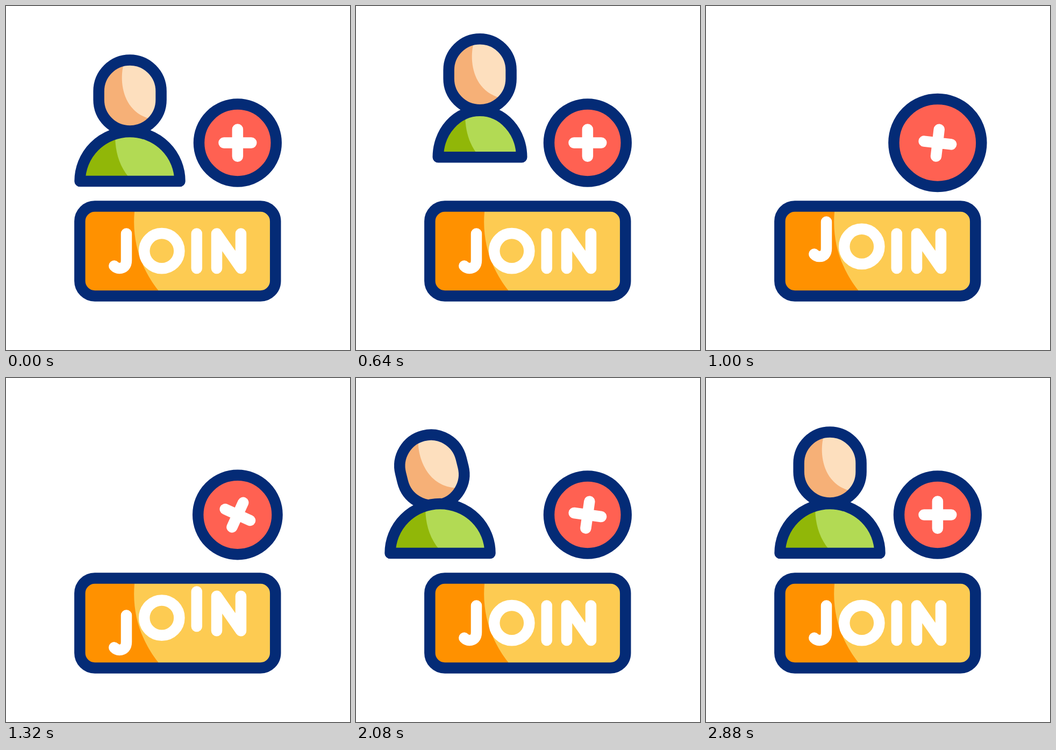
Write an HTML page that moves like this. It is 640 by 640 pixels and loops after 3 s.

```html
<!DOCTYPE html>
<html lang="en">
<head>
<meta charset="utf-8">
<title>Join</title>
<style>
  html, body { margin: 0; width: 100%; height: 100%; overflow: hidden; background: #fff; }
  svg { display: block; width: 100%; height: 100%; }
  .line { fill: none; stroke: #042b76; stroke-width: 20.5; stroke-linejoin: round; }
  .white { fill: none; stroke: #fff; stroke-width: 20.5; stroke-linecap: round; stroke-linejoin: round; }
</style>
</head>
<body>
<svg viewBox="0 0 640 640" role="img" aria-label="Join">
  <defs>
    <rect id="headShape" x="172.6" y="100.5" width="116" height="132" rx="58"/>
    <path id="bodyShape"/>
    <rect id="buttonShape" x="137.3" y="372.5" width="364" height="167" rx="28"/>
    <clipPath id="headClip"><use href="#headShape"/></clipPath>
    <clipPath id="bodyClip"><use href="#bodyShape"/></clipPath>
    <clipPath id="buttonClip"><use href="#buttonShape"/></clipPath>
    <clipPath id="aboveButton"><rect width="640" height="372"/></clipPath>
  </defs>

  <g clip-path="url(#aboveButton)">
    <g id="person">
      <g id="head">
        <g clip-path="url(#headClip)">
          <rect x="160" y="90" width="140" height="150" fill="#f6b077"/>
          <path d="M219 108 C211 135 214 195 268 210 L300 215 V90 H222 Z" fill="#fddfbe"/>
        </g>
        <use href="#headShape" class="line"/>
      </g>
      <g id="body">
        <g clip-path="url(#bodyClip)">
          <rect x="120" y="220" width="220" height="120" fill="#91b708"/>
          <path d="M203 220 V240 C203 270 210 296 228 318 L240 340 H340 V220 Z" fill="#b2da54"/>
        </g>
        <use href="#bodyShape" class="line"/>
      </g>
    </g>
  </g>

  <circle id="badge" class="line" cx="430.9" cy="254.5" style="fill:#ff6152"/>
  <path id="plus" class="white" d="M405.5 254.5 H456.3 M430.9 229.5 V279.7"/>

  <g clip-path="url(#buttonClip)">
    <rect x="130" y="365" width="380" height="180" fill="#ff9100"/>
    <path d="M239 365 V383 C234 440 252 490 284 530 L292 545 H510 V365 Z" fill="#fdcb52"/>
  </g>
  <use href="#buttonShape" class="line"/>

  <g class="white">
    <path class="letter" d="M224 423.5 V473 C224 483 219 488 211 488 C207 488 204 486.5 201.3 483.5"/>
    <circle class="letter" cx="289.8" cy="455.7" r="32.6"/>
    <path class="letter" d="M354.8 423.5 V488"/>
    <path class="letter" d="M392 488 V423.5 L437 488 V423.5"/>
  </g>
</svg>
<script>
  const LOOP = 3000, STEP = 40;
  const $ = id => document.getElementById(id);
  const letters = document.querySelectorAll('.letter');
  const move = (el, x, y) => el.setAttribute('transform', `translate(${x} ${y})`);

  // Eased value between [time, value] keys.
  function track(t, keys) {
    if (t <= keys[0][0]) return keys[0][1];
    for (let i = 1; i < keys.length; i++) {
      const [t0, a] = keys[i - 1], [t1, b] = keys[i];
      if (t < t1) {
        const u = (t - t0) / (t1 - t0);
        return a + (b - a) * u * u * (3 - 2 * u);
      }
    }
    return keys[keys.length - 1][1];
  }

  function drawPerson(t) {
    const entering = t >= 1760;
    const x = entering ? track(t, [[1760, -366], [2210, 0]]) : 0;
    const y = entering ? 0 : track(t, [[200, 0], [680, -40], [1000, 305]]);
    const pinch = entering ? 0 : track(t, [[200, 0], [660, 1], [1000, 0]]);
    const tilt = track(t, [[1760, 0], [2080, -14], [2480, 6], [2840, 0]]);
    const sink = entering ? track(t, [[2400, 3], [2840, 0]]) : 0;

    move($('person'), x, y);
    $('head').setAttribute('transform', `translate(0 ${sink}) rotate(${tilt} 230.5 230)`);

    const w = 93 - 15.3 * pinch, base = 326 - 5.5 * pinch;
    $('bodyShape').setAttribute('d',
      `M${230.5 - w} ${base} A${w} ${base - 234} 0 0 1 ${230.5 + w} ${base} Z`);
  }

  function draw(t) {
    drawPerson(t);
    $('badge').setAttribute('r', 71.9 + track(t, [[800, 0], [1120, 14], [1600, -18.5], [2080, 0]]));
    const turn = track(t, [[800, 0], [1410, 26], [2470, 0]]);
    $('plus').setAttribute('transform', `rotate(${turn} 430.9 254.5)`);
    letters.forEach((el, i) =>
      move(el, 0, track(t - i * 120, [[760, 0], [1080, -26], [1400, 26], [1720, 0]])));
  }

  const start = performance.now();
  function tick() {
    const t = (performance.now() - start) % LOOP;
    draw(Math.floor(t / STEP) * STEP);
    requestAnimationFrame(tick);
  }
  draw(0);
  requestAnimationFrame(tick);
</script>
</body>
</html>
```
